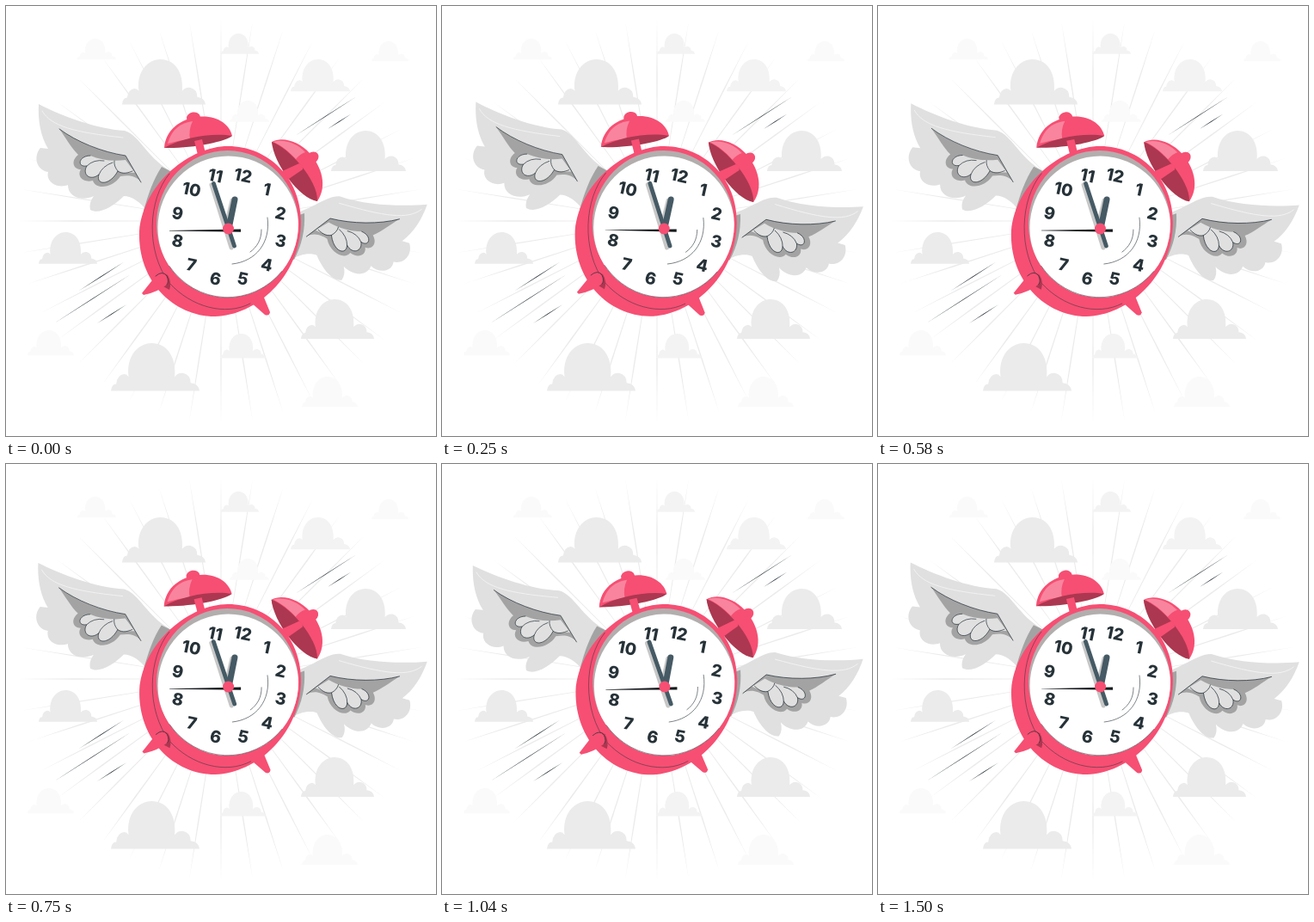
Recreate the animation shown at these times as an HTML page. Size 500 by 500 pixels, loop 1.54 s.

```html
<!DOCTYPE html>
<html lang="en">
<head>
<meta charset="utf-8">
<title>Flying alarm clock</title>
<style>
  html, body { margin: 0; width: 100%; height: 100%; overflow: hidden; background: #fff; }
  svg { display: block; width: 100%; height: 100%; }
  .red { fill: #f64f73; }
  .dark { fill: #ac3750; }
  .pale { fill: #f9849d; }
  .wing { fill: #e0e0e0; }
  .shade { fill: #a3a3a3; }
  .ink { fill: none; stroke: #263238; stroke-width: .7; stroke-linecap: round; stroke-linejoin: round; }
  .shine { fill: none; stroke: #f5f5f5; stroke-width: .8; stroke-linecap: round; }
  text { font: 800 19.5px Inter, "Open Sans", sans-serif; fill: #263238; text-anchor: middle; }
</style>
</head>
<body>
<svg viewBox="0 0 500 500">
  <defs>
    <path id="cloud" d="M0 54Q1 46 6 46Q7 36 15 35Q18 35 20 38C17 16 30 0 46 0C62 0 74 14 72 38Q76 33 82 34Q90 36 90 45Q99 46 100 54Z"/>
    <clipPath id="dial"><ellipse cx="257.5" cy="253.5" rx="82.5" ry="85.5"/></clipPath>
    <g id="wing">
      <path class="wing" d="M38 114C65 128 105 143 138 145C155 150 164 176 190 191L164 239C157 228 146 221 137 221C125 233 108 243 98 237Q96 229 102 221C89 227 72 223 72 208C59 213 46 204 49 193C36 191 31 176 40 165L49 166C40 151 37 133 38 114Z"/>
      <path class="shine" d="M42 122C52 140 80 147 136 153"/>
      <path class="shade" d="M62 143C82 158 112 170 139 174L157 205C150 196 140 197 133 198C124 212 104 214 101 203C90 206 82 198 87 190C78 190 75 180 84 173C76 165 70 154 62 143Z"/>
      <path class="wing" d="M98 174C84 174 82 188 94 186C88 196 98 204 108 196C104 208 120 210 130 192C136 196 146 193 150 194L139 179C124 181 110 179 98 174Z"/>
      <path class="ink" d="M62 143C82 158 112 170 139 174L157 205M98 174C84 174 82 188 94 186C88 196 98 204 108 196C104 208 120 210 130 192C136 196 142 194 147 192M94 186Q102 178 114 180M108 196Q112 186 124 182M130 192Q125 186 126 180"/>
    </g>
  </defs>
  <g id="rays" fill="#ebebeb"></g>
  <g id="clouds"></g>
  <g id="streaks" fill="#263238"></g>

  <g id="clock">
    <!-- the right wing mirrors the left one -->
    <use href="#wing"/>
    <use href="#wing" transform="translate(377 247) rotate(22.5) scale(-.97 .97) translate(-139 -174)"/>
    <path class="shade" d="M181 187L195 194L172 243L160 238C165 220 171 202 181 187Z"/>
    <path class="shade" d="M338 244L347 241C348 260 344 278 335 295L329 292Z"/>

    <!-- left bell -->
    <ellipse class="red" cx="218" cy="130" rx="8" ry="6.5" transform="rotate(-9 218 130)"/>
    <path class="red" d="M184 165C186 143 203 132 222 129C244 126 260 137 263 151C238 153 212 158 184 165Z"/>
    <path class="pale" d="M188 160C193 143 203 136 217 134Q212 144 214 155Q201 156 188 160Z"/>
    <path class="dark" d="M184 165C205 153 240 147 263 151C255 158 215 166 184 165Z"/>
    <path class="red" d="M219 157L228 155L232 171L223 173Z"/>

    <!-- right bell -->
    <ellipse class="red" cx="356" cy="176.5" rx="8" ry="6.5" transform="rotate(-38 356 176.5)"/>
    <path class="red" d="M309 158C322 151 341 158 353 171C367 187 374 209 362 227C344 222 313 181 309 158Z"/>
    <path class="pale" d="M311 158C323 154 339 160 348 170Q342 172 337 178C329 169 320 162 311 158Z"/>
    <path class="dark" d="M309 158C328 164 363 202 362 227C341 224 311 183 309 158Z"/>
    <path class="red" d="M319 193L341 183Q346 186 345 190L326 203Z"/>

    <!-- case -->
    <path class="red" d="M284 344L298 334L307 356Q306 361 301 359Z"/>
    <path class="red" d="M258 163C215 163 160 205 155 262C153 320 195 361 243 361C290 360 343 315 343 251C343 200 305 163 258 163Z"/>
    <path class="ink" d="M190 195C165 225 162 285 190 322C215 350 255 361 284 346" style="stroke-width:.5"/>
    <path class="dark" d="M174 315Q181 307 188 313Q193 321 190 330L181 325Z"/>
    <path class="red" d="M158 334L174 314Q182 307 187 314Q190 321 187 324Q176 333 160 336Z"/>
    <path class="ink" d="M174 314Q182 307 187 314Q190 321 187 324"/>

    <!-- dial -->
    <g clip-path="url(#dial)">
      <rect x="170" y="160" width="180" height="190" fill="#b3aeae"/>
      <ellipse cx="258.5" cy="258" rx="82" ry="83.5" fill="#fff"/>
    </g>
    <path class="ink" d="M190 302.5A82.5 85.5 0 0 0 320.7 308.5" style="stroke-width:.5"/>
    <g id="digits"></g>
    <path class="ink" d="M304 246C308 275 291 297 263 300M297 260C297 272 292 280 284 286" style="stroke-width:.6"/>

    <!-- hands -->
    <g fill="none" stroke-linecap="round">
      <path d="M239 208L262 281M263 226L255 259" stroke="#c7c7c7" stroke-width="5"/>
      <path d="M266 225L259 259" stroke="#455a64" stroke-width="7"/>
      <path d="M241.5 206.5L265.5 279" stroke="#455a64" stroke-width="4.8"/>
    </g>
    <path d="M190 261L273 259.5V262.7L190 261.4Z" fill="#161b1d"/>
    <circle class="red" cx="258.5" cy="259" r="6.5"/>
  </g>
</svg>
<script>
  const NS = "http://www.w3.org/2000/svg";
  const byId = id => document.getElementById(id);

  function add(parent, tag, attrs, text = "") {
    const el = document.createElementNS(NS, tag);
    for (const key in attrs) el.setAttribute(key, attrs[key]);
    el.textContent = text;
    byId(parent).append(el);
  }

  // Slim rays, one every nine degrees
  for (let angle = 0; angle < 360; angle += 9) {
    add("rays", "path", {
      d: "M250 250L249.3 80L250 14L250.7 80Z",
      transform: `rotate(${angle} 250 250)`
    });
  }

  // Clouds by tone: left, top, width
  const clouds = {
    "#ebebeb": [[135, 62, 97], [122, 392, 103], [378, 145, 87], [343, 341, 85], [38, 263, 68]],
    "#f3f3f3": [[331, 62, 69], [250, 32, 44], [249, 381, 53]],
    "#fafafa": [[83, 38, 45], [425, 41, 43], [260, 110, 46], [25, 377, 54], [344, 431, 65]]
  };
  for (const fill in clouds) {
    for (const [x, y, width] of clouds[fill]) {
      add("clouds", "use", {
        href: "#cloud", fill,
        transform: `translate(${x} ${y}) scale(${width / 100})`
      });
    }
  }

  // Parallel speed streaks: start point and width
  const streaks = [[336, 151, 72], [374, 143, 27], [85, 331, 52], [56, 369, 89], [106, 369, 34]];
  for (const [x, y, w] of streaks) {
    const h = w * .64;
    add("streaks", "path", {
      d: `M${x} ${y}l${w / 2 - .2} ${-h / 2 - .3}L${x + w} ${y - h}l${.2 - w / 2} ${h / 2 + .3}Z`
    });
  }

  // Dial numbers on a tilted circle
  for (let n = 1; n <= 12; n++) {
    const a = (n * 30 + 15) * Math.PI / 180;
    const x = 259.5 + 62 * Math.sin(a), y = 257 - 62 * Math.cos(a);
    add("digits", "text", { y: 7, transform: `translate(${x} ${y}) rotate(12)` }, n);
  }

  const LOOP = 1540, PHASE = .04;
  const clock = byId("clock");

  // Linear swing: 0 to 1 to -1 to 0 degrees
  function swing(u) {
    u -= Math.floor(u);
    return u < .25 ? 4 * u : u < .75 ? 2 - 4 * u : 4 * u - 4;
  }

  function draw(ms) {
    const angle = swing(ms / LOOP + PHASE) - swing(PHASE);
    clock.setAttribute("transform", `rotate(${angle.toFixed(4)} 263.5 237)`);
  }

  const start = performance.now();
  function tick() {
    draw((performance.now() - start) % LOOP);
    requestAnimationFrame(tick);
  }
  tick();
</script>
</body>
</html>
```
